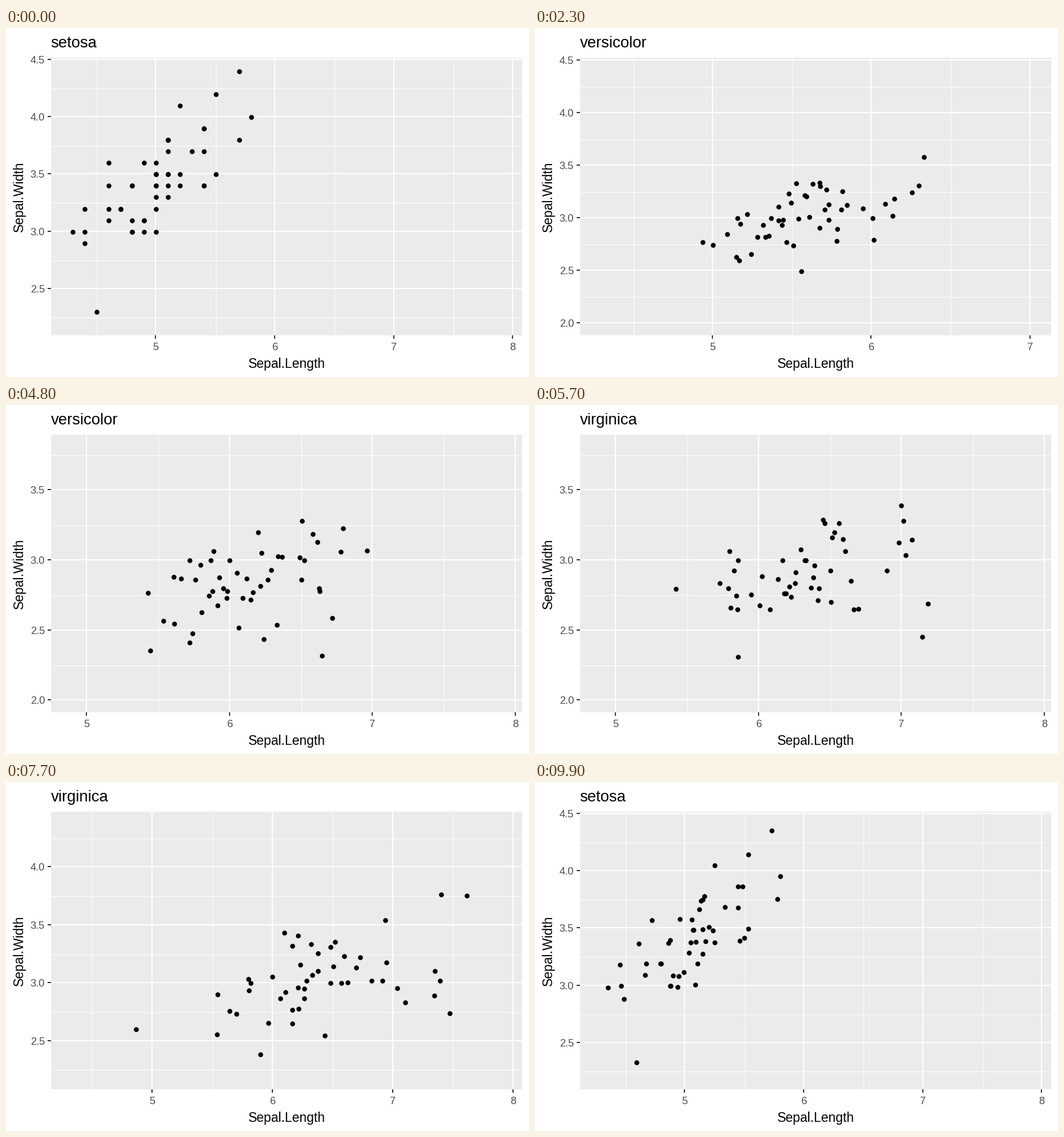
Write a matplotlib script that moves like this. It is 917x611 px and loops after 10 s.

```python
import numpy as np
import matplotlib.pyplot as plt
from matplotlib.animation import FuncAnimation
from matplotlib.collections import LineCollection
from matplotlib.patches import Rectangle

W, H, DPI = 917, 611, 64
PT = 72 / DPI                                  # points per pixel
LEFT, RIGHT, TOP, BOTTOM = 79, 905, 52, 538    # painted panel
X0, X1, Y0, Y1 = 78.5, 905.2, 52.7, 538.2      # exact panel for scaling
FRAMES, INTERVAL = 100, 100

plt.rcParams["font.family"] = "Liberation Sans"

# Flower measurements in tenths of a centimetre
setosa_len = [
    51, 49, 47, 46, 50, 54, 46, 50, 44, 49, 54, 48, 48, 43, 58, 57, 54,
    51, 57, 51, 54, 51, 46, 51, 48, 50, 50, 52, 52, 47, 48, 54, 52, 55,
    49, 50, 55, 49, 44, 51, 50, 45, 44, 50, 51, 48, 51, 46, 53, 50]
setosa_wid = [
    35, 30, 32, 31, 36, 39, 34, 34, 29, 31, 37, 34, 30, 30, 40, 44, 39,
    35, 38, 38, 34, 37, 36, 33, 34, 30, 34, 35, 34, 32, 31, 34, 41, 42,
    31, 32, 35, 36, 30, 34, 35, 23, 32, 35, 38, 30, 38, 32, 37, 33]
versicolor_len = [
    70, 64, 69, 55, 65, 57, 63, 49, 66, 52, 50, 59, 60, 61, 56, 67, 56,
    58, 62, 56, 59, 61, 63, 61, 64, 66, 68, 67, 60, 57, 55, 55, 58, 60,
    54, 60, 67, 63, 56, 55, 55, 61, 58, 50, 56, 57, 57, 62, 51, 57]
versicolor_wid = [
    32, 32, 31, 23, 28, 28, 33, 24, 29, 27, 20, 30, 22, 29, 29, 31, 30,
    27, 22, 25, 32, 28, 25, 28, 29, 30, 28, 30, 29, 26, 24, 24, 27, 27,
    30, 34, 31, 23, 30, 25, 26, 30, 26, 23, 27, 30, 29, 29, 25, 28]
virginica_len = [
    63, 58, 71, 63, 65, 76, 49, 73, 67, 72, 65, 64, 68, 57, 58, 64, 65,
    77, 77, 60, 69, 56, 77, 63, 67, 72, 62, 61, 64, 72, 74, 79, 64, 63,
    61, 77, 63, 64, 60, 69, 67, 69, 58, 68, 67, 67, 63, 65, 62, 59]
virginica_wid = [
    33, 27, 30, 29, 30, 30, 25, 29, 25, 36, 32, 27, 30, 25, 28, 32, 30,
    38, 26, 22, 32, 28, 28, 27, 33, 32, 28, 30, 28, 30, 28, 38, 28, 28,
    26, 30, 34, 31, 30, 31, 31, 31, 27, 32, 33, 30, 25, 30, 34, 30]

names = ["setosa", "versicolor", "virginica"]
states = [np.array(s) / 10 for s in (
    (setosa_len, setosa_wid),
    (versicolor_len, versicolor_wid),
    (virginica_len, virginica_wid))]


def view_of(a, b):
    """Padded window (low, high) per axis around two states."""
    pts = np.hstack([states[a], states[b]])
    lo, hi = pts.min(axis=1), pts.max(axis=1)
    pad = 0.05 * (hi - lo)
    return np.array([lo - pad, hi + pad])


views = [view_of(2, 0), view_of(0, 1), view_of(1, 2)]
DATA_MOVES = [(6, 33), (40, 67), (74, 100)]
VIEW_MOVES = [(1, 13), (34, 46), (68, 80)]


def progress(frame, moves):
    """Current step and how far it has gone, from 0 to 1."""
    step = sum(frame >= end for _, end in moves[:-1])
    start, end = moves[step]
    return step, min(max((frame - start) / (end - start), 0), 1)


def cubic_in_out(t):
    return 4 * t**3 if t < 0.5 else 1 - 4 * (1 - t)**3


def blend(items, step, t):
    return items[step] * (1 - t) + items[(step + 1) % 3] * t


fig = plt.figure(figsize=(W / DPI, H / DPI), dpi=DPI, facecolor="white")
ax = fig.add_axes([0, 0, 1, 1])
ax.set_xlim(0, W)
ax.set_ylim(H, 0)
ax.axis("off")

panel = Rectangle((LEFT, TOP), RIGHT - LEFT, BOTTOM - TOP, fc="#ebebeb", lw=0)
ax.add_patch(panel)


def add_lines(color, width, z):
    lines = LineCollection([], colors=color, linewidths=width * PT,
                           capstyle="butt", zorder=z)
    ax.add_collection(lines, autolim=False)
    return lines


def add_text(x, y, s, px, color="black", ha="center", **kw):
    return ax.text(x, y, s, fontsize=px * PT, color=color, ha=ha,
                   va="baseline", **kw)


minor = add_lines("white", 1, 2)
major = add_lines("white", 2, 3)
ticks = add_lines("#333333", 2, 3)
for grid in (minor, major):
    grid.set_clip_path(panel)

dots, = ax.plot([], [], "o", color="black", ms=8.6 * PT, mew=0, zorder=4)
dots.set_clip_path(panel)

title = add_text(78.5, 34, "", 27.5, ha="left")
add_text(492, 595, "Sepal.Length", 22.9)
add_text(30, 295, "Sepal.Width", 22.9, rotation=90, rotation_mode="anchor")

x_labels = {v: add_text(0, 564, f"{v:g}", 18.33, "#4d4d4d")
            for v in np.arange(5, 9)}
y_labels = {v: add_text(68, 0, f"{v:.1f}", 18.33, "#4d4d4d", "right")
            for v in np.arange(2, 4.6, 0.5)}


def update(frame):
    step, t = progress(frame, VIEW_MOVES)
    (xlo, ylo), (xhi, yhi) = blend(views, step, cubic_in_out(t))

    def to_x(v):
        return np.round(X0 + (v - xlo) / (xhi - xlo) * (X1 - X0))

    def to_y(v):
        return np.round(Y1 - (v - ylo) / (yhi - ylo) * (Y1 - Y0))

    def vline(x):
        return [(x, TOP), (x, BOTTOM)]

    def hline(y):
        return [(LEFT, y), (RIGHT, y)]

    major_segs, tick_segs = [], []
    for v, label in x_labels.items():
        shown = xlo <= v <= xhi
        label.set_visible(shown)
        if shown:
            x = to_x(v)
            label.set_x(x)
            major_segs.append(vline(x))
            tick_segs.append([(x, BOTTOM), (x, BOTTOM + 6)])
    for v, label in y_labels.items():
        shown = ylo <= v <= yhi
        label.set_visible(shown)
        if shown:
            y = to_y(v)
            label.set_y(y + 7)
            major_segs.append(hline(y))
            tick_segs.append([(LEFT - 6, y), (LEFT, y)])
    major.set_segments(major_segs)
    ticks.set_segments(tick_segs)
    minor.set_segments(
        [vline(to_x(v) + 0.5) for v in np.arange(4.5, 8) if xlo <= v <= xhi]
        + [hline(to_y(v) + 0.5) for v in np.arange(2.25, 4.5, 0.5)
           if ylo <= v <= yhi])

    step, t = progress(frame, DATA_MOVES)
    px, py = blend(states, step, t)
    dots.set_data(to_x(px) + 0.5, to_y(py) + 0.5)
    title.set_text(names[(step + (t >= 0.5)) % 3])
    return dots, title, major, minor, ticks


anim = FuncAnimation(fig, update, frames=FRAMES, interval=INTERVAL,
                     init_func=lambda: update(0), repeat=True,
                     repeat_delay=0, blit=False)
plt.show()
```
